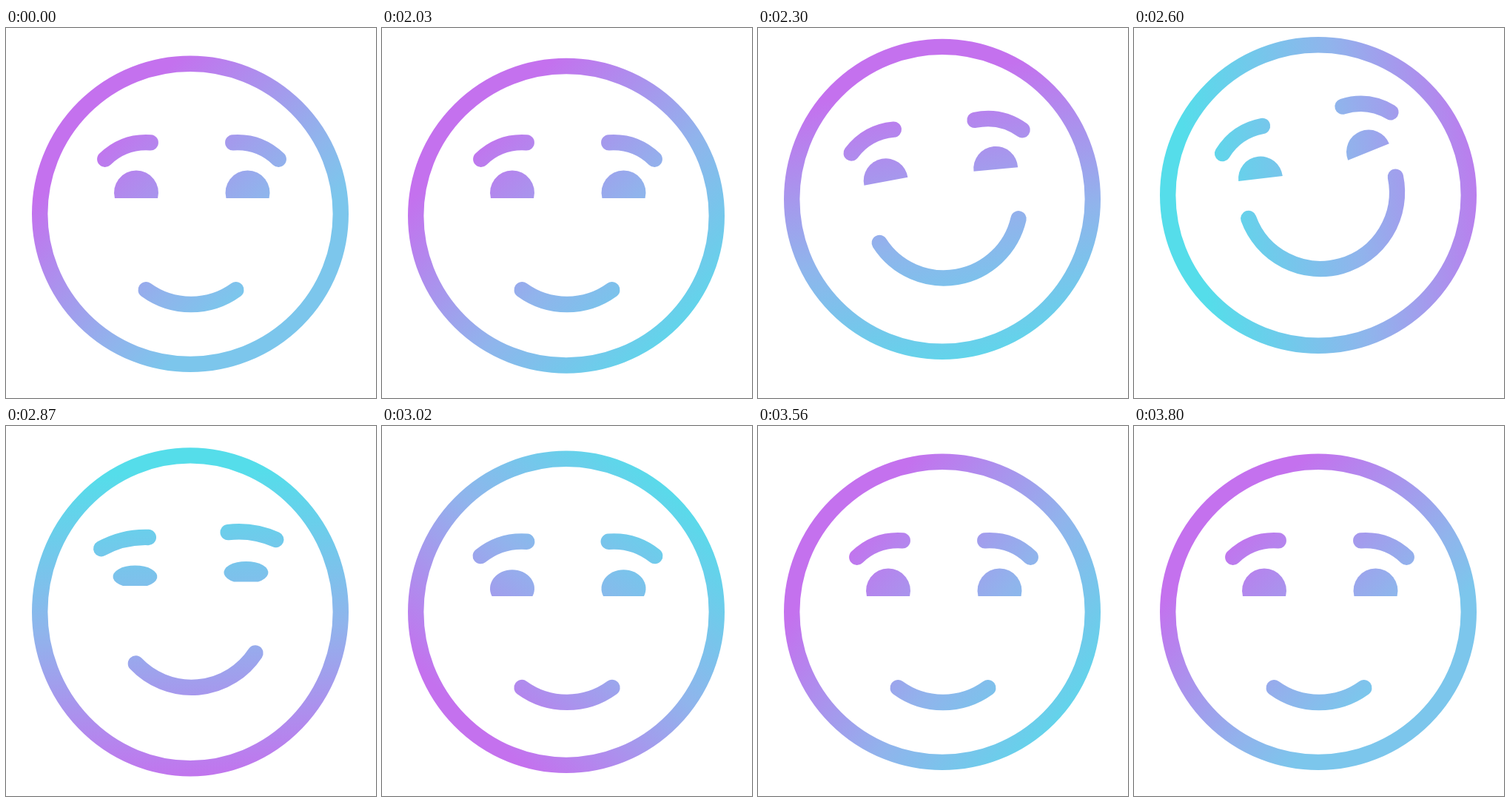
An HTML page for the animation above (3.83 s loop, 500 by 500 pixels).

```html
<!DOCTYPE html>
<html lang="en">
<head>
<meta charset="utf-8">
<title>Smiling face</title>
<style>
  html, body { margin: 0; width: 100%; height: 100%; overflow: hidden; background: #fff; }
  svg { display: block; width: 100vw; height: 100vh; }
  .line { fill: none; stroke: url(#tint); stroke-width: 21.4; stroke-linecap: round; }
  .fill { fill: url(#tint); }
</style>
</head>
<body>
<svg viewBox="0 0 500 500">
  <defs>
    <linearGradient id="tint" gradientUnits="userSpaceOnUse" x1="300" y1="60" x2="300" y2="484">
      <stop offset="0" stop-color="#c471ee"/>
      <stop offset=".5" stop-color="#90b4ec"/>
      <stop id="tail" offset="1" stop-color="#55ddea"/>
    </linearGradient>
  </defs>
  <ellipse id="ring" class="line" cx="249" rx="203.3"/>
  <path id="browL" class="line"/>
  <path id="browR" class="line"/>
  <path id="eyeL" class="fill"/>
  <path id="eyeR" class="fill"/>
  <path id="mouth" class="line"/>
</svg>
<script>
const LOOP = 3830, START = 2000, STEP = 30, MOVE = 1800;
const el = id => document.getElementById(id);
const rad = deg => deg * Math.PI / 180;
const mix = (a, b, k) => a + (b - a) * k;

// Eased step from 0 to 1 between two times
function smooth(from, to, t) {
  const u = Math.min(1, Math.max(0, (t - from) / (to - from)));
  return u * u * (3 - 2 * u);
}

// Soft bump reaching 1 at mid
function bump(mid, half, t) {
  const u = (t - mid) / half;
  return Math.abs(u) < 1 ? Math.cos(u * Math.PI / 2) ** 2 : 0;
}

// Cubic bezier easing (.33, 0, .44, 1)
function ease(x) {
  let lo = 0, hi = 1;
  for (let n = 0; n < 24; n++) {
    const s = (lo + hi) / 2, r = 1 - s;
    if (0.99 * r * r * s + 1.32 * r * s * s + s ** 3 < x) lo = s; else hi = s;
  }
  return lo * lo * (3 - 2 * lo);
}

// Maps offsets in a tilted frame at (x, y) to stage coordinates
function frame(x, y, tilt) {
  const c = Math.cos(rad(tilt)), s = Math.sin(rad(tilt));
  return (dx, dy) => `${x + dx * c - dy * s} ${y + dx * s + dy * c}`;
}

function drawBrow(id, x, y, tilt, bend) {
  const at = frame(x, y, tilt), half = 32.7;
  el(id).setAttribute("d", `M${at(-half, 0)}Q${at(0, -bend)} ${at(half, 0)}`);
}

// An ellipse cut off along a line through (x, y)
function drawEye(id, x, y, tilt, ry, cut) {
  const at = frame(x, y, tilt), half = 30 * Math.sqrt(1 - (cut / ry) ** 2);
  el(id).setAttribute("d",
    `M${at(-half, 0)}A30 ${ry} ${tilt} ${cut > 0 ? 1 : 0} 1 ${at(half, 0)}Z`);
}

// Part of a circle, reaching left and right from its lowest point
function drawMouth(x, y, left, right) {
  const r = 103.5;
  const at = deg => `${x + r * Math.sin(rad(deg))} ${y + r * Math.cos(rad(deg))}`;
  el("mouth").setAttribute("d",
    `M${at(-left)}A${r} ${r} 0 ${left + right > 180 ? 1 : 0} 0 ${at(right)}`);
}

function drawFace(t) {
  const laugh = smooth(90, 450, t) - smooth(600, 1030, t);
  const lead = 1 - (1 - laugh) ** 2;   // left side moves ahead
  const drift = laugh ** 1.3;          // sideways shift lags
  const squint = bump(870, 240, t);

  const flat = 1 - 0.45 * squint, bend = 14.5 * (1 - 0.38 * squint);
  drawBrow("browL", mix(164.5, 146.5, drift), mix(166, 151, lead),
    mix(-20, -34.6, laugh) * flat, bend);
  drawBrow("browR", mix(337.5, 314.5, drift), mix(166, 110, laugh),
    mix(20, 6.8, laugh) * flat, bend);

  const ry = 30 * (1 - squint / 2), cut = 7.5 * (1 - lead) + 9 * squint;
  const open = 1 - squint;
  drawEye("eyeL", mix(176, 171, laugh), mix(230, 203.5, lead),
    -10.5 * Math.sin(2.46 * laugh) * open, ry, cut);
  drawEye("eyeR", mix(326.5, 317, drift), mix(230, 167.5, laugh),
    -22 * laugh ** 3 * open, ry, cut);

  drawMouth(mix(250, 252, laugh), mix(270, 222, (laugh + lead) / 2),
    mix(36, 70, laugh), mix(36, 101.6, laugh));
}

function drawRing(t) {
  const dip = bump(110, 110, t);
  const lift = smooth(110, 380, t) - smooth(600, 870, t);
  const stretch = 4 * bump(250, 140, t) + 8.3 * bump(870, 290, t) - 5 * dip;
  el("ring").setAttribute("cy", 251.3 + 14 * dip - 25.3 * lift);
  el("ring").setAttribute("ry", 203.1 + stretch);
}

function drawTint(t) {
  const angle = -45 + 360 * ease(t / MOVE);
  el("tint").setAttribute("gradientTransform", `rotate(${angle} 300 272)`);
  // At rest the blue end stays softer
  const still = t === 0 || t === MOVE;
  el("tail").setAttribute("offset", still ? 0.67 : 1);
  el("tail").setAttribute("stop-color", still ? "#7cc6ec" : "#55ddea");
}

function tick() {
  const now = performance.now() % LOOP;
  const t = Math.max(0, Math.floor((now - START) / STEP)) * STEP;
  drawFace(t);
  drawRing(t);
  drawTint(t);
  requestAnimationFrame(tick);
}
tick();
</script>
</body>
</html>
```
